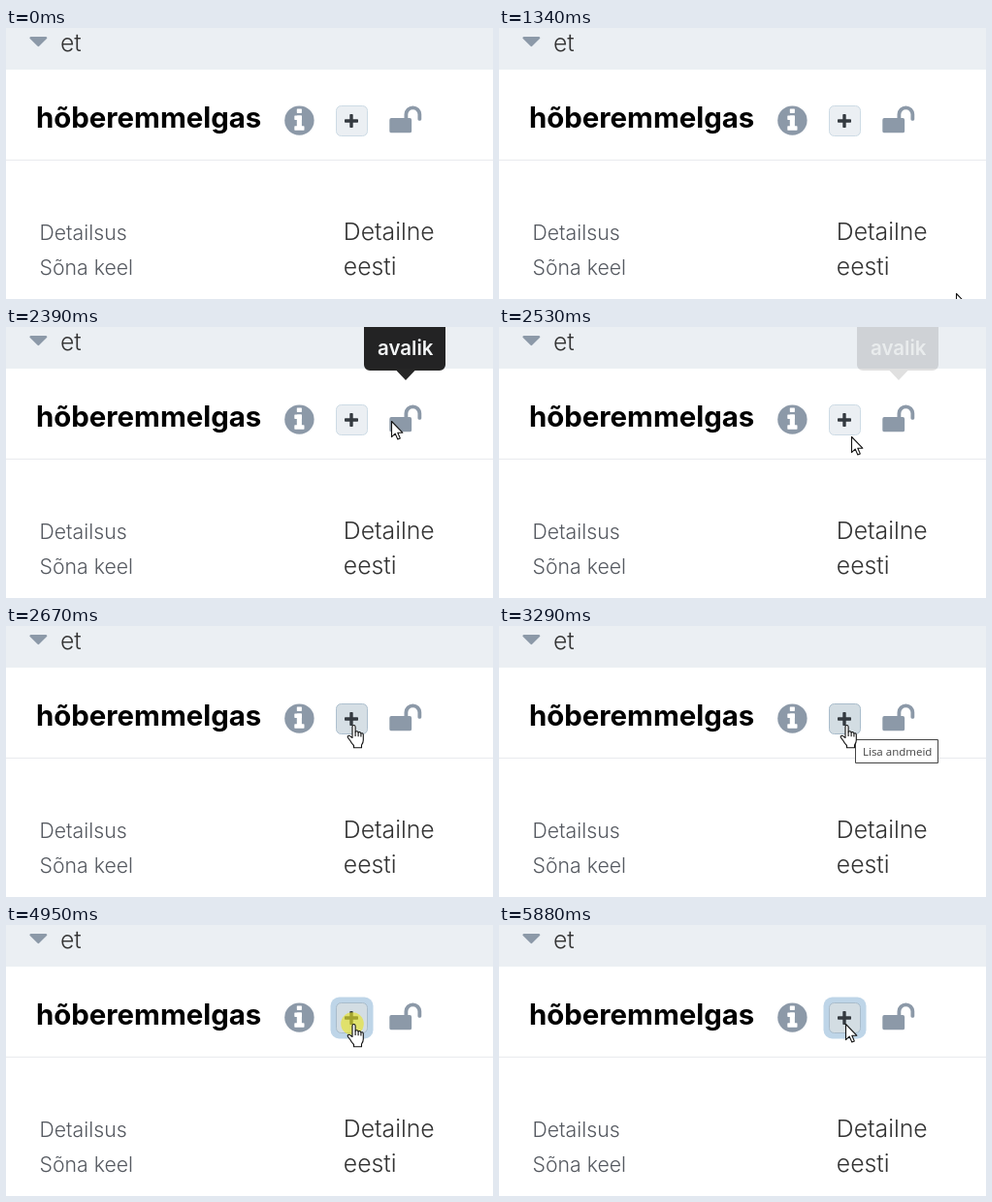
An HTML page with a canvas for the animation above (5950 ms loop, 502 by 280 pixels).

```html
<!DOCTYPE html>
<html lang="et">
<head>
<meta charset="utf-8">
<style>
html, body { margin: 0; width: 100%; height: 100%; overflow: hidden; background: #fff; }
canvas { display: block; width: 502px; height: 280px; }
</style>
</head>
<body>
<canvas id="stage" width="502" height="280"></canvas>
<script>
const ctx = document.getElementById('stage').getContext('2d');
const LOOP = 5950, STEP = 70;
const MOVE = 1340, HOVER = 2600, HINT = 3290, PRESS = 4740, RELEASE = 5880;
const ICON = '#8c99a8';
const INTER = 'Inter, sans-serif';

// pointer tip: step, x, y
const PATH = [
  [0, 471, 274], [1, 465, 261], [4, 450, 222], [7, 434, 189], [8, 411, 179],
  [11, 406, 125], [13, 404, 100], [15, 397, 97], [16, 384, 103], [17, 363, 113]
];

const ARROW = new Path2D('M.5 .5V16.6L4.2 13.1L6.8 19L9.3 17.9L6.8 12.2H11.8Z');
const HAND = new Path2D(
  'M5.5 13.5V2.2Q5.5 .5 7 .5T8.6 2.2V7.6Q9 6.6 10.2 6.7T11.6 8.4' +
  'Q12 7.4 13.1 7.6T14.4 9.3Q14.8 8.5 15.8 8.8T16.8 10.6V16' +
  'Q16.8 18.6 15 21V23.8H7V21.5Q4.6 19 3 16L.9 13.3Q.3 12.2 1.3 11.5T3.3 11.9Z');
const KNUCKLES = new Path2D('M8.6 7.5V12M11.6 8.4V12.2M14.4 9.3V12.6');
const LOCK = new Path2D(
  'M1664 576v256q0 64-64 64h-64q-64 0-64-64V576a256 256 0 0 0-512 0v192h96' +
  'q96 0 96 96v576q0 96-96 96H96q-96 0-96-96V864q0-96 96-96h672V576a448 448 0 0 1 896 0z');
const CARET = new Path2D(
  'M1024 640q0 26-19 45L557 1133q-45 38-90 0L19 685q-19-19-19-45t19-45 45-19h896q26 0 45 19t19 45z');

const clamp = v => Math.max(0, Math.min(1, v));
const mix = (a, b, k) => `rgb(${a.map((v, i) => Math.round(v + (b[i] - v) * k))})`;
const easeOut = k => 1 - (1 - clamp(k)) ** 2;

function text(str, x, y, font, color) {
  ctx.font = font;
  ctx.fillStyle = color;
  ctx.fillText(str, x, y);
}

function box(x, y, w, h, r, fill, stroke) {
  ctx.beginPath();
  ctx.roundRect(x, y, w, h, r);
  if (fill) { ctx.fillStyle = fill; ctx.fill(); }
  if (stroke) { ctx.strokeStyle = stroke; ctx.lineWidth = 1; ctx.stroke(); }
}

function disc(x, y, r, fill) {
  ctx.fillStyle = fill;
  ctx.beginPath();
  ctx.arc(x, y, r, 0, Math.PI * 2);
  ctx.fill();
}

function icon(path, x, y, scale) {
  ctx.save();
  ctx.translate(x, y);
  ctx.scale(scale, scale);
  ctx.fillStyle = ICON;
  ctx.fill(path);
  ctx.restore();
}

function pointer(path, x, y, lines) {
  ctx.save();
  ctx.translate(x, y);
  ctx.lineWidth = 1.1;
  ctx.lineJoin = 'round';
  ctx.fillStyle = '#fff';
  ctx.strokeStyle = '#111';
  ctx.fill(path);
  ctx.stroke(path);
  if (lines) ctx.stroke(lines);
  ctx.restore();
}

function page() {
  ctx.fillStyle = '#fff';
  ctx.fillRect(0, 0, 502, 280);
  ctx.fillStyle = '#ebeff3';
  ctx.fillRect(0, 0, 502, 43);
  ctx.fillStyle = '#e9ebee';
  ctx.fillRect(0, 136, 502, 1);

  const label = `350 21.25px ${INTER}`, value = `350 24.8px ${INTER}`;
  icon(CARET, 24.4, -1, 0.0175);
  text('et', 56, 24, value, '#333');
  text('hõberemmelgas', 31, 103, `700 29.4px ${INTER}`, '#000');

  disc(302.4, 95.6, 15.2, ICON);
  box(299.8, 83.5, 5.1, 4.4, 0.6, '#fff');
  box(297.3, 90.5, 7.6, 4.4, 0.6, '#fff');
  box(299.8, 90.5, 5.1, 14, 0.6, '#fff');
  box(297.3, 101.3, 10.2, 4.4, 0.6, '#fff');
  icon(LOCK, 395.3, 77.9, 0.0198);

  text('Detailsus', 34.5, 219, label, '#555960');
  text('Sõna keel', 34.5, 255, label, '#555960');
  text('Detailne', 347.8, 219, value, '#333');
  text('eesti', 347.8, 255, value, '#333');
}

function button(hover, focus) {
  if (focus > 0) box(334.5, 74.5, 44, 43, 9, `rgba(120,168,208,${0.48 * focus})`);
  box(340.5, 80.5, 32, 31, 5,
    mix([235, 239, 243], [211, 221, 227], hover),
    mix([205, 219, 229], [169, 188, 203], hover));
  box(349, 94.3, 14, 3.4, 0.8, '#343a40');
  box(354.3, 89, 3.4, 14, 0.8, '#343a40');
}

function lockTip(alpha) {
  if (alpha <= 0) return;
  ctx.save();
  ctx.globalAlpha = alpha;
  ctx.fillStyle = '#000';
  ctx.beginPath();
  ctx.roundRect(369, -6, 84, 51, 6);
  ctx.moveTo(402.5, 45);
  ctx.lineTo(421.5, 45);
  ctx.lineTo(412, 55);
  ctx.fill();
  // lettering stays legible while the bubble fades
  ctx.globalAlpha = Math.min(1, alpha * 6);
  text('avalik', 383, 29, `600 20.5px ${INTER}`, '#f3f5f6');
  ctx.restore();
}

function hint() {
  box(367.5, 117.5, 85, 24, 0, '#fff', '#444');
  text('Lisa andmeid', 375, 134, '11.5px "Open Sans", "Noto Sans", sans-serif', '#444');
}

function tipAt(step) {
  const i = Math.max(1, PATH.findIndex(p => p[0] >= step));
  const [a, b] = [PATH[i - 1], PATH[i]];
  const k = (step - a[0]) / (b[0] - a[0]);
  return [1, 2].map(j => Math.round(a[j] + (b[j] - a[j]) * k));
}

function draw(time) {
  const t = time % LOOP;
  const now = MOVE + Math.floor((t - MOVE) / STEP) * STEP;
  const sincePress = Math.floor((t - PRESS) / STEP) * STEP;

  const hover = t < HOVER ? 0 : easeOut((now - HOVER + 50) / 190);
  const focus = t < PRESS ? 0 : easeOut(sincePress / 200);
  const shown = easeOut((now - 2180) / 150);
  const gone = easeOut((now - 2390) / 225);

  page();
  button(hover, focus);
  if (t < HOVER) lockTip(0.85 * shown * (1 - gone));
  if (t >= HINT && t < PRESS) hint();
  if (t >= PRESS && t < RELEASE) disc(357, 102, 11.8, 'rgba(232,228,36,.62)');

  if (t >= RELEASE) pointer(ARROW, 357, 102);
  else if (t >= HOVER) pointer(HAND, 351.5, 102, KNUCKLES);
  else if (t >= MOVE) pointer(ARROW, ...tipAt((now - MOVE) / STEP));
}

const start = performance.now();
function frame() {
  draw(performance.now() - start);
  requestAnimationFrame(frame);
}
frame();
</script>
</body>
</html>
```
